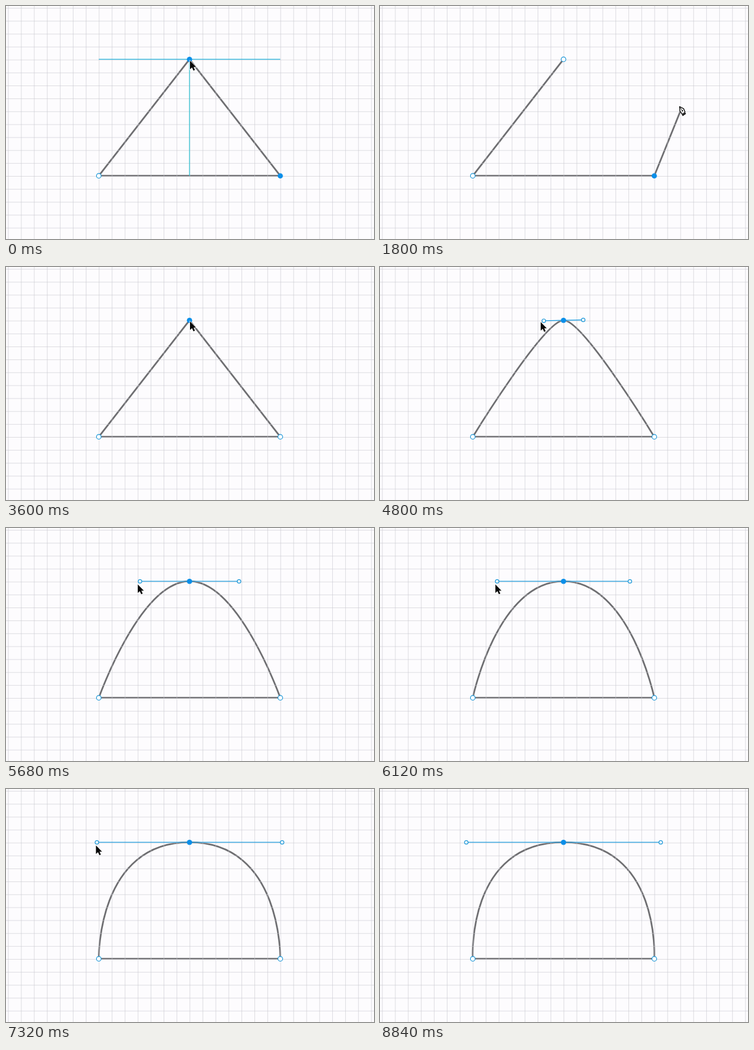
Write an HTML page with a canvas that moves like this. It is 600 px wide and 381 px high and loops after 9720 ms.

```html
<!DOCTYPE html>
<html lang="en">
<head>
<meta charset="utf-8">
<title>Path editing</title>
<style>
  html, body { margin: 0; width: 100%; height: 100%; overflow: hidden; background: #fdfcfe; }
  canvas { display: block; width: 600px; height: 381px; }
</style>
</head>
<body>
<canvas id="stage"></canvas>
<script>
const W = 600, H = 381, LOOP = 9720;
const canvas = document.getElementById('stage');
const ctx = canvas.getContext('2d');
const ratio = window.devicePixelRatio || 1;
canvas.width = W * ratio;
canvas.height = H * ratio;
ctx.scale(ratio, ratio);

const GRID = { x: 3.3, y: 3.1, step: 21.145 };
const APEX = [299.2, 87.2], LEFT = [151.3, 277.7], RIGHT = [447.2, 277.7];
const BLUE = '#0b8fe9', RIM = '#1c97d8', TEAL = '#2cbfd0', STROKE = '#6e6e71';

// Phases of the loop
const DRAW = 160, CLOSED = 3600, BEND = 4360, DONE = 8840;

// Bursts of movement: first step, last step, number of steps
const BURSTS = [
  [DRAW, 320, 2], [1800, 2120, 3], [2400, 3440, 8], [CLOSED, CLOSED, 1],
  [BEND, 5400, 8], [5520, 6440, 7], [6600, 7480, 7], [8680, DONE, 2]
];

// Pen tip: [time, x, y]
const PEN = [
  [DRAW, 440, 125], [320, 486, 164], [1800, 488, 164],
  [2120, 295, 46], [3000, 318, 84], [3440, 297.5, 84]
];

// Handle length: [time, length]
const REACH = [[BEND, 6], [5400, 67], [5520, 67], [6440, 149.5], [6600, 136], [7480, 158.5]];

// Time of the latest step; the picture rests between steps.
function stepTime(time) {
  const burst = BURSTS.filter(b => b[0] <= time).pop();
  if (!burst) return 0;
  const [from, to, count] = burst;
  const gap = (to - from) / (count - 1) || 1;
  const slack = 8;
  return from + gap * Math.min(count - 1, Math.floor((time - from + slack) / gap));
}

function tween(keys, t) {
  const next = keys.findIndex(k => k[0] >= t);
  if (next === 0) return keys[0].slice(1);
  if (next < 0) return keys[keys.length - 1].slice(1);
  const a = keys[next - 1], b = keys[next];
  const k = (t - a[0]) / (b[0] - a[0]);
  return a.slice(1).map((v, i) => v + (b[i + 1] - v) * k);
}

function line(a, b, color = STROKE, width = 2.7) {
  ctx.strokeStyle = color;
  ctx.lineWidth = width;
  ctx.beginPath();
  ctx.moveTo(...a);
  ctx.lineTo(...b);
  ctx.stroke();
}

function curve(from, handle) {
  ctx.strokeStyle = STROKE;
  ctx.lineWidth = 2.7;
  ctx.beginPath();
  ctx.moveTo(...from);
  ctx.bezierCurveTo(...from, ...handle, ...APEX);
  ctx.stroke();
}

function dot([x, y], solid, r = 3.8) {
  ctx.beginPath();
  ctx.arc(x, y, solid ? 4.3 : r, 0, Math.PI * 2);
  ctx.fillStyle = solid ? BLUE : '#fff';
  ctx.fill();
  if (solid) return;
  ctx.strokeStyle = RIM;
  ctx.lineWidth = 1.2;
  ctx.stroke();
}

function grid() {
  ctx.fillStyle = 'rgba(198, 198, 205, 0.58)';
  for (let x = GRID.x; x < W; x += GRID.step) ctx.fillRect(x, 0, 1, H);
  for (let y = GRID.y; y < H; y += GRID.step) ctx.fillRect(0, y, W, 1);
}

const arrowShape = new Path2D('M0 0V15L3.5 11.8L6 17.2L8.6 16L6.2 10.9H10.6Z');
const nibShape = new Path2D('M0.5 0.5L7 3.8L9.4 9.8L4.8 13.2L1 7.6Z');

function arrow(x, y) {
  ctx.save();
  ctx.translate(x, y);
  ctx.scale(0.94, 0.94);
  ctx.strokeStyle = '#fff';
  ctx.lineWidth = 1.4;
  ctx.stroke(arrowShape);
  ctx.fillStyle = '#080808';
  ctx.fill(arrowShape);
  ctx.restore();
}

function pen(x, y) {
  const ink = '#0a0a0a';
  ctx.save();
  ctx.translate(x, y);
  ctx.lineJoin = 'round';
  ctx.fillStyle = '#fff';
  ctx.fill(nibShape);
  ctx.strokeStyle = ink;
  ctx.lineWidth = 1.4;
  ctx.stroke(nibShape);
  line([0.5, 0.5], [5, 7.4], ink, 0.9);
  ctx.beginPath();
  ctx.arc(5, 7.4, 1.1, 0, Math.PI * 2);
  ctx.fillStyle = ink;
  ctx.fill();
  line([5, 15.2], [10.4, 11.4], ink, 2);
  ctx.restore();
}

function snap(x, y) {
  const col = Math.round((x - GRID.x) / GRID.step);
  const row = Math.round((y - GRID.y) / GRID.step);
  return [GRID.x + col * GRID.step, GRID.y + row * GRID.step];
}

const near = (a, b) => Math.abs(a - b) < 1;

function triangle() {
  line(LEFT, APEX);
  line(APEX, RIGHT);
  line(LEFT, RIGHT);
  grid();
}

function dots(rightSolid, apexSolid) {
  dot(LEFT);
  dot(RIGHT, rightSolid);
  dot(APEX, apexSolid);
}

function opening() {
  triangle();
  line([LEFT[0], APEX[1]], [RIGHT[0], APEX[1]], '#22b2dc', 1.3);
  line(APEX, [APEX[0], LEFT[1]], TEAL, 1.2);
  dots(true, true);
  arrow(300, 89.5);
}

function drawing(t) {
  const [x, y] = tween(PEN, t);
  const end = snap(x + 1, y + 3);
  line(LEFT, APEX);
  line(LEFT, RIGHT);
  line(RIGHT, end);
  grid();
  if (near(end[0], APEX[0]) || near(end[1], APEX[1])) line(APEX, end, '#22a8dc', 1.2);
  dots(true, near(end[0], APEX[0]) && near(end[1], APEX[1]));
  pen(x, y);
}

function closed() {
  triangle();
  dots(false, true);
  arrow(300, 89);
}

function bending(t) {
  const [reach] = tween(REACH, t);
  const tilt = Math.max(0, Math.min(6, (4840 - t) / 50));
  const a = [APEX[0] - reach, APEX[1] + tilt];
  const b = [APEX[0] + reach, APEX[1] - tilt];
  curve(LEFT, a);
  curve(RIGHT, b);
  line(LEFT, RIGHT);
  grid();
  line(a, b, '#239fe0', 1.3);
  dot(a, false, 2.9);
  dot(b, false, 2.9);
  dots(false, true);
  if (t < DONE) arrow(a[0] - 6 + reach / 34, a[1] + Math.min(5, reach / 16));
}

function frame(time) {
  const t = stepTime(time % LOOP);
  ctx.fillStyle = '#fdfcfe';
  ctx.fillRect(0, 0, W, H);
  if (t < DRAW) opening();
  else if (t < CLOSED) drawing(t);
  else if (t < BEND) closed();
  else bending(t);
}

const start = performance.now();
function tick() {
  frame(performance.now() - start);
  requestAnimationFrame(tick);
}
tick();
</script>
</body>
</html>
```
